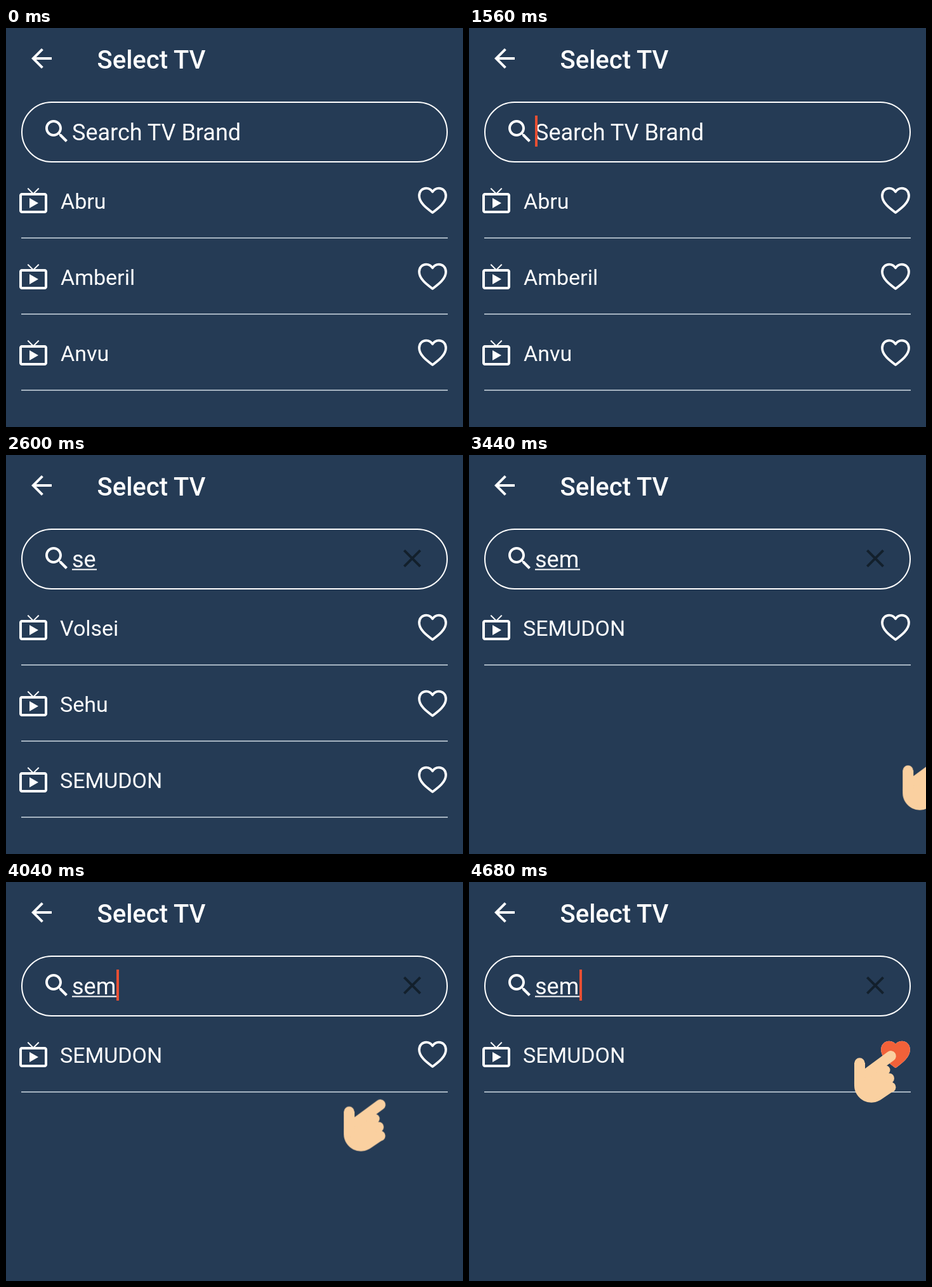
These frames come from a looping animation (720 px wide and 629 px high, 5000 ms). An HTML page:

```html
<!DOCTYPE html>
<html lang="en">
<head>
<meta charset="utf-8">
<title>Select TV</title>
<style>
  html, body { margin: 0; width: 100%; height: 100%; overflow: hidden; background: #253b55; }
  svg { display: block; }
  text { font-family: Roboto, sans-serif; fill: #fff; }
  .title { font-size: 40px; font-weight: 500; }
  .query text { font-size: 36px; }
  .names text { font-size: 34px; }
  .rule { fill: #a6b4c1; }
  .heart { fill: none; stroke: #fff; stroke-width: 3.8; stroke-linejoin: round; }

  /* Hard cuts on a shared five-second clock */
  .empty, .one, .two, .three, .typed, .wide, .caret, .liked { animation: 5s step-end infinite; }
  .empty { animation-name: empty; }
  .one   { animation-name: one; }
  .two   { animation-name: two; }
  .three { animation-name: three; }
  .typed { animation-name: typed; }
  .wide  { animation-name: wide; }
  .caret { animation-name: caret; }
  .liked { animation-name: liked; }
  .hand  { animation: hand 5s linear infinite; }

  @keyframes empty { 0% { opacity: 1 } 33.6%, 100% { opacity: 0 } }
  @keyframes one   { 0% { opacity: 0 } 33.6% { opacity: 1 } 42.4%, 100% { opacity: 0 } }
  @keyframes two   { 0% { opacity: 0 } 42.4% { opacity: 1 } 53.6%, 100% { opacity: 0 } }
  @keyframes three { 0% { opacity: 0 } 53.6%, 100% { opacity: 1 } }
  @keyframes typed { 0% { opacity: 0 } 33.6%, 100% { opacity: 1 } }
  @keyframes wide  { 0% { opacity: 1 } 53.6%, 100% { opacity: 0 } }
  @keyframes liked { 0% { opacity: 0 } 91.2%, 100% { opacity: 1 } }

  @keyframes caret {
    0%    { opacity: 0; transform: translateX(0) }
    11.2% { opacity: 1; transform: translateX(0) }
    21.2% { opacity: 0; transform: translateX(0) }
    31.2% { opacity: 1; transform: translateX(0) }
    33.6% { opacity: 1; transform: translateX(18px) }
    42.4% { opacity: 1; transform: translateX(38px) }
    52%   { opacity: 0; transform: translateX(38px) }
    53.6% { opacity: 1; transform: translateX(70px) }
    64%   { opacity: 0; transform: translateX(70px) }
    74%   { opacity: 1; transform: translateX(70px) }
    84%   { opacity: 0; transform: translateX(70px) }
    93.6%, 100% { opacity: 1; transform: translateX(70px) }
  }

  @keyframes hand {
    0%, 68% { transform: translate(230px, 110px); animation-timing-function: ease-out }
    75.2%   { transform: translate(0, 0); animation-timing-function: cubic-bezier(.4, 0, .8, .7) }
    79.2%   { transform: translate(23px, -28px) }
    85.6%   { transform: translate(79px, -96.5px); animation-timing-function: ease-out }
    90.4%, 100% { transform: translate(112px, -122px) }
  }
</style>
</head>
<body>
<svg width="720" height="629" viewBox="0 0 720 629">
  <defs>
    <path id="heart" d="M672 291C664 285 651 276 651 264.5C651 257 656 252.6 662 252.6C666.5 252.6 670 255 672 258.3C674 255 677.5 252.6 682 252.6C688 252.6 693 257 693 264.5C693 276 680 285 672 291Z"/>
    <g id="row">
      <path fill="#fff" transform="translate(19 248) scale(2)" d="M21 6h-7.59l3.29-3.29L16 2l-4 4-4-4-.7.71L10.59 6H3c-1.1 0-2 .89-2 2v12c0 1.1.9 2 2 2h18c1.1 0 2-.9 2-2V8c0-1.11-.9-2-2-2zm0 14H3V8h18v12zM9 10v8l7-4z"/>
      <use href="#heart" class="heart"/>
      <rect class="rule" x="24" y="330" width="672" height="2"/>
    </g>
  </defs>

  <rect width="720" height="629" fill="#253b55"/>
  <path fill="#fff" transform="translate(32 24) scale(2)" d="M20 11H7.83l5.59-5.59L12 4l-8 8 8 8 1.41-1.41L7.83 13H20v-2z"/>
  <text class="title" x="143.5" y="64">Select TV</text>

  <rect x="25" y="117" width="670" height="94" rx="47" fill="none" stroke="#fff" stroke-width="2"/>
  <path fill="#fff" transform="translate(56 139) scale(2)" d="M15.5 14h-.79l-.28-.27C15.41 12.59 16 11.11 16 9.5 16 5.91 13.09 3 9.5 3S3 5.91 3 9.5 5.91 16 9.5 16c1.61 0 3.09-.59 4.23-1.57l.27.28v.79l5 4.99L20.49 19l-4.99-5zm-6 0C7.01 14 5 11.99 5 9.5S7.01 5 9.5 5 14 7.01 14 9.5 11.99 14 9.5 14z"/>
  <path class="typed" stroke="#13202c" stroke-width="4" d="M627.4 150.4l25.2 25.2m0-25.2l-25.2 25.2"/>

  <g class="query" fill="#fff">
    <text class="empty" x="104" y="177">Search TV Brand</text>
    <g class="one"><text x="104" y="177">s</text><rect x="104" y="179.5" width="19" height="2"/></g>
    <g class="two"><text x="104" y="177">se</text><rect x="104" y="179.5" width="39" height="2"/></g>
    <g class="three"><text x="104" y="177">sem</text><rect x="104" y="179.5" width="71" height="2"/></g>
  </g>
  <rect class="caret" x="104" y="138" width="4" height="49" fill="#e84f33"/>

  <use href="#row"/>
  <g class="wide">
    <use href="#row" y="120"/>
    <use href="#row" y="240"/>
  </g>

  <g class="names">
    <g class="empty">
      <text x="86" y="285">Abru</text>
      <text x="86" y="405">Amberil</text>
      <text x="86" y="525">Anvu</text>
    </g>
    <g class="one">
      <text x="85" y="285">Ansolu</text>
      <text x="85" y="405">Besuri</text>
      <text x="85" y="525">Dasomi</text>
    </g>
    <g class="two">
      <text x="85" y="285">Volsei</text>
      <text x="85" y="405">Sehu</text>
      <text x="85" y="525">SEMUDON</text>
    </g>
    <text class="three" x="85" y="285">SEMUDON</text>
  </g>

  <g class="liked" fill="#f26139" stroke="#f26139" stroke-width="3.8" stroke-linejoin="round">
    <use href="#heart"/>
  </g>

  <g class="hand" fill="#fad0a0">
    <path d="M495 407V443A27 27 0 0 0 538.2 464.3L557 451.5L552 437L545 418L530 410L512 417V407Z"/>
    <path fill="none" stroke="#fad0a0" stroke-width="16.5" stroke-linecap="round" d="M503.4 407.5L503.2 440M552.6 396.3L516 423.4"/>
    <circle cx="544" cy="418.5" r="7.5"/>
    <circle cx="550" cy="431.5" r="8"/>
    <circle cx="552.5" cy="445.5" r="8"/>
  </g>
</svg>
</body>
</html>
```
